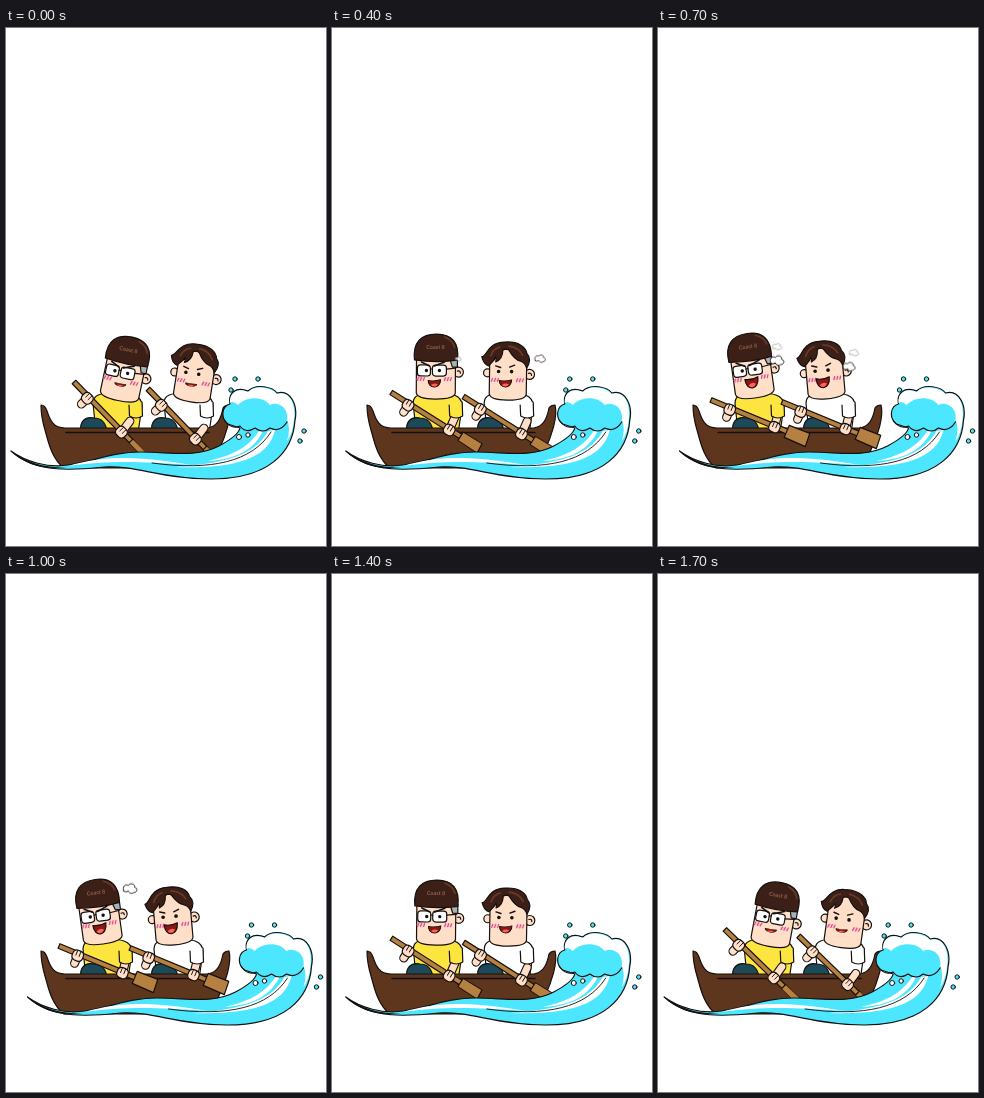
Animation, 320 px wide and 518 px high, one loop 1.8 s. Source, as an HTML page without scripts:

```html
<!DOCTYPE html>
<html lang="en">
<head>
<meta charset="utf-8">
<title>Two rowers on a wave</title>
<style>
  /* --lean: 1 = rowers forward, 0 = back; --surf: wave travel from left to right */
  @property --lean { syntax: "<number>"; inherits: true; initial-value: 1; }
  @property --surf { syntax: "<number>"; inherits: true; initial-value: 0; }

  html, body { margin: 0; height: 100%; overflow: hidden; background: #fff; }
  svg {
    display: block; width: 100%; height: 100%;
    stroke: #15100e; stroke-width: 1.2; stroke-linejoin: round; stroke-linecap: round;
    animation: row 1.8s infinite;
  }
  /* An eased swing there and back, held for 100 ms at a time */
  @keyframes row {
    0%     { --lean: 1;   --surf: 0;  animation-timing-function: steps(2); }
    11.11% { --lean: .81; --surf: 2.3; animation-timing-function: steps(3); }
    27.77% { --lean: .22; --surf: 12; animation-timing-function: steps(2); }
    38.88%, 61.11% { --lean: 0; --surf: 16.5; animation-timing-function: steps(2); }
    72.22% { --lean: .22; --surf: 12; animation-timing-function: steps(3); }
    88.88% { --lean: .85; --surf: 2.3; animation-timing-function: steps(2); }
    100%   { --lean: 1;   --surf: 0; }
  }

  .wave { transform: translateX(calc(var(--surf) * 1px)); }
  .torso { transform: translateX(calc(var(--lean) * 10px)); }
  .head {
    transform: translate(calc(var(--x) + var(--dx) * var(--lean)), calc(var(--y) + 2.5px * var(--lean)))
               rotate(calc(var(--tilt) + var(--turn) * var(--lean)));
  }
  .paddle {
    transform: translate(calc(var(--x) + var(--dx) * var(--lean)), calc(var(--y) + var(--dy) * var(--lean)))
               rotate(calc(22.5deg + 23.5deg * var(--lean)));
  }
  .capped { --x: 97px; --y: 369px; --dx: 15px; --tilt: -8deg; --turn: 20deg; }
  .parted { --x: 166.5px; --y: 370px; --dx: 16px; --tilt: -5deg; --turn: 14deg; }
  .left { --x: 53px; --y: 372px; --dx: 15px; --dy: -18px; }
  .right { --x: 124px; --y: 374px; --dx: 18px; --dy: -13px; }
  .mouth { transform: scale(calc(.95 - .15 * var(--lean)), calc(.95 - .68 * var(--lean))); }
  .blade { transform: scaleY(calc(1 - .6 * var(--lean))); }

  .puff { opacity: 0; fill: #fff; stroke-width: 1; animation: 1.8s infinite steps(3); }
  .p1 { animation-name: p1; } .p2 { animation-name: p2; }
  .p3 { animation-name: p3; } .p4 { animation-name: p4; }
  @keyframes p1 {
    0%, 11.1% { opacity: 0; transform: translate(215px, 335px) scale(.4); }
    11.11% { opacity: .5; transform: translate(215px, 335px) scale(.4); animation-timing-function: steps(2); }
    22.22% { opacity: 1; transform: translate(208px, 331px) scale(.7); }
    38.88% { opacity: .5; transform: translate(196px, 325px) scale(.6); animation-timing-function: step-end; }
    44.44%, 100% { opacity: 0; }
  }
  @keyframes p2 {
    0%, 22.2% { opacity: 0; transform: translate(126px, 331px) scale(.4); }
    22.22% { opacity: .8; transform: translate(126px, 331px) scale(.4); }
    38.88% { opacity: .5; transform: translate(119px, 319px) scale(.6); animation-timing-function: step-end; }
    44.44%, 100% { opacity: 0; }
  }
  @keyframes p3 {
    0%, 33.3% { opacity: 0; transform: translate(113px, 337px) scale(.7); }
    33.33% { opacity: 1; transform: translate(113px, 337px) scale(.7); animation-timing-function: step-end; }
    38.88% { opacity: 1; transform: translate(119px, 333px) scale(.9); }
    55.55% { opacity: 1; transform: translate(124px, 315px) scale(.9); animation-timing-function: step-end; }
    61.11% { opacity: .5; transform: translate(126px, 312px) scale(.7); animation-timing-function: step-end; }
    66.66%, 100% { opacity: 0; }
  }
  @keyframes p4 {
    0%, 33.3% { opacity: 0; transform: translate(186px, 342px) scale(.6); }
    33.33% { opacity: 1; transform: translate(186px, 342px) scale(.6); animation-timing-function: step-end; }
    38.88% { opacity: 1; transform: translate(191px, 339px) scale(.8); animation-timing-function: steps(2); }
    50% { opacity: .5; transform: translate(198px, 325px) scale(.6); animation-timing-function: step-end; }
    55.55%, 100% { opacity: 0; }
  }

  .skin { fill: #ffdfc8; }
  .hair { fill: #3c2018; }
  .sheen { fill: none; stroke: #6b3a2a; stroke-width: 1.6; }
  .yellow { fill: #fde540; }
  .white { fill: #fff; }
  .water { fill: #4ce7ff; }
  .line { fill: none; }
  .flat { stroke: none; }
  .limb { fill: none; stroke-width: 9; }
  .limb + .limb { stroke: #ffdfc8; stroke-width: 6.8; }
</style>
</head>
<body>
<svg viewBox="0 0 320 518">
  <defs>
    <path id="shirt" d="M77 375C77 367 84 365 98 365C114 365 126 366 126 378L122 405H80Z"/>
    <path id="sleeve" d="M113 377L113.500 388Q120 392 126.500 388L126 374"/>
    <path id="legs" fill="#1d4a5b" d="M75 404C73 394 79 388 88 390C96 390 100 395 101 404Z"/>
    <path id="puff" d="M-7 2C-9-3-5-6-2-4C0-7 6-6 5-2C9-1 8 4 4 4C1 6-1 4-2 2C-4 4-6 3-7 2Z"/>
    <circle id="drop" r="2.200" class="water" stroke-width="1"/>

    <g id="fist">
      <rect class="skin" x="-5.500" y="-4.500" width="11" height="10.500" rx="4"/>
      <path class="line" stroke-width=".9" d="M-2-4V1M1.500-4V1"/>
    </g>
    <g id="oar">
      <g>
        <path class="limb" d="M21 2L21 10"/>
        <path class="limb" d="M21 2L21 10"/>
      </g>
      <g fill="#b58040">
        <rect x="0" y="-2.500" width="84" height="5"/>
        <path class="blade" d="M82-6.500L104-7L105 7L82 6.500Z"/>
      </g>
      <g>
        <path class="limb" d="M69 0L67-13"/>
        <path class="limb" d="M69 0L67-13"/>
      </g>
      <use href="#fist" x="21" y="1"/>
      <use href="#fist" x="69"/>
    </g>

    <g id="grin">
      <g class="mouth">
        <path fill="#8d1716" d="M-7-4Q0-2 7-5C7 3 3 6 0 6C-4 6-7 2-7-4Z"/>
        <path class="flat" fill="#ff6257" d="M-4 3Q0-1 4 2Q2 5.300 0 5.300Q-3 5-4 3Z"/>
      </g>
    </g>
    <g id="blush">
      <ellipse class="flat" fill="#ffb3c6" fill-opacity=".6" rx="4" ry="2"/>
      <path class="line" stroke="#d9508f" stroke-width="1.200" d="M-3 1.500L-2-1.500M0 1.500L1-1.500M3 1.500L4-1.500"/>
    </g>
  </defs>

  <!-- Rowers' bodies -->
  <g class="torso">
    <use href="#shirt" class="yellow"/>
    <use href="#shirt" class="white" x="71"/>
  </g>
  <use href="#legs"/>
  <use href="#legs" x="71"/>

  <!-- Boat -->
  <path fill="#5d361d" d="M35 377Q39 377 41 383C44 392 47 400 59 400H202C212 398 215 390 217 380Q219 377 223 377C226 388 220 408 212 424L198 440H58C45 430 42 412 39 402C36 392 35 384 35 377Z"/>
  <path class="line" stroke-width="1.500" d="M60 404.500H203"/>

  <!-- Heads -->
  <g class="head capped">
    <circle class="skin" cx="23" cy="-26" r="5"/>
    <path class="line" d="M22-27q3-1 3 2"/>
    <path class="skin" d="M-19-40V-5Q-18 1 0 1Q19 1 20-5V-40Z"/>
    <path fill="#a7b2b8" d="M14-40H22V-31H17Z"/>
    <g class="white">
      <rect x="-18" y="-33" width="13" height="11" rx="3"/>
      <rect x="-3" y="-33" width="14" height="11" rx="3"/>
    </g>
    <path class="line" d="M-5-29H-3M11-29L20-30"/>
    <path class="line" stroke-width="1.600" d="M-14-36L-6-32M9-36L-1-32"/>
    <g class="flat" fill="#15100e">
      <circle cx="-9" cy="-27.500" r="1.700"/>
      <circle cx="4" cy="-27.500" r="1.700"/>
    </g>
    <use href="#blush" x="-15" y="-19"/>
    <use href="#blush" x="12" y="-19"/>
    <use href="#grin" x="-1" y="-15"/>
    <g transform="translate(0 -38)">
      <path class="hair" d="M-21 0C-23-18-14-26 1-26C16-26 24-18 22 0Q1 3-21 0Z"/>
      <path class="sheen" d="M9-23Q17-20 19-13"/>
      <text class="flat" x="0" y="-11" fill="#93604c" font-family="Lato, sans-serif" font-size="5.500" font-weight="700" text-anchor="middle">Coast 8</text>
    </g>
  </g>

  <g class="head parted">
    <circle class="skin" cx="-18" cy="-26" r="4"/>
    <circle class="skin" cx="24" cy="-25" r="5"/>
    <path class="line" d="M23-26q3-1 3 2"/>
    <path class="skin" d="M-16-42V-5Q-15 1 2 1Q20 1 21-5V-42Q2-58-16-42Z"/>
    <path class="hair" d="M-17-33C-21-34-23-38-24-42C-19-42-18-57-1-57C13-58 20-52 21-46C25-42 24-36 21-31C20-35 18-37 15-38C10-39 6-44 3-49Q0-51-3-49C-3-44-5-39-10-37Q-9-40-10-42C-11-38-15-36-17-33Z"/>
    <path class="sheen" d="M3-53Q13-52 17-44M-6-52Q-13-50-15-43"/>
    <path class="line" stroke-width="1.400" d="M-10-33L-5-31.500M9-34L4-32"/>
    <g class="flat" fill="#15100e">
      <circle cx="-7" cy="-27.500" r="1.800"/>
      <circle cx="6" cy="-27.500" r="1.800"/>
    </g>
    <use href="#blush" x="-11" y="-19"/>
    <use href="#blush" x="14" y="-19"/>
    <use href="#grin" x="0" y="-16"/>
  </g>

  <!-- Paddles and near arms -->
  <g class="paddle left"><use href="#oar"/></g>
  <g class="torso"><use href="#sleeve" class="yellow"/></g>
  <g class="paddle right"><use href="#oar"/></g>
  <g class="torso"><use href="#sleeve" class="white" x="71"/></g>

  <!-- Wave -->
  <g class="wave">
    <path class="water" d="M5 423C20 434 42 440 62 437C90 433 105 424 135 424C165 424 190 430 213 418C226 411 233 405 234 400L222 396C214 390 216 378 224 376C222 365 230 358 242 363C250 355 267 359 271 365C285 361 292 378 289 392C287 425 262 451 205 451C155 451 130 437 98 439C70 442 30 446 5 423Z"/>
    <path class="white flat" d="M224 375C223 366 231 359 242 364C250 356 266 360 271 366C284 362 290 377 288 391Q287 405 281 413Q285 400 281 392C283 380 272 373 264 377C256 367 239 369 232 377Q227 372 224 375Z"/>
    <path class="white flat" d="M269 402C263 428 235 441 170 439C225 435 250 425 262 403Z"/>
    <path class="white flat" d="M257 403C248 421 232 431 202 433C229 427 243 418 253 403Z"/>
    <path class="white flat" d="M62 438C100 427 130 428 186 437C130 433 100 433 62 438Z"/>
    <path class="flat" fill="#15100e" d="M5 423C22 436 42 440 60 439C40 442 20 438 5 423Z"/>
    <path class="line" stroke-width=".9" d="M146 435C205 443 246 434 265 404"/>
    <path class="line" d="M219 393Q226 402 234 398Q240 406 249 400Q257 406 264 400Q274 405 281 394"/>
    <g class="white" stroke-width="1">
      <circle cx="233" cy="409" r="2.500"/>
      <circle cx="242" cy="407" r="2.200"/>
    </g>
    <use href="#drop" x="229" y="351"/>
    <use href="#drop" x="252" y="351"/>
    <use href="#drop" x="225" y="362"/>
    <use href="#drop" x="298" y="403"/>
    <use href="#drop" x="294" y="413"/>
  </g>

  <!-- Puffs of breath -->
  <use href="#puff" class="puff p1"/>
  <use href="#puff" class="puff p2"/>
  <use href="#puff" class="puff p3"/>
  <use href="#puff" class="puff p4"/>
</svg>
</body>
</html>
```
